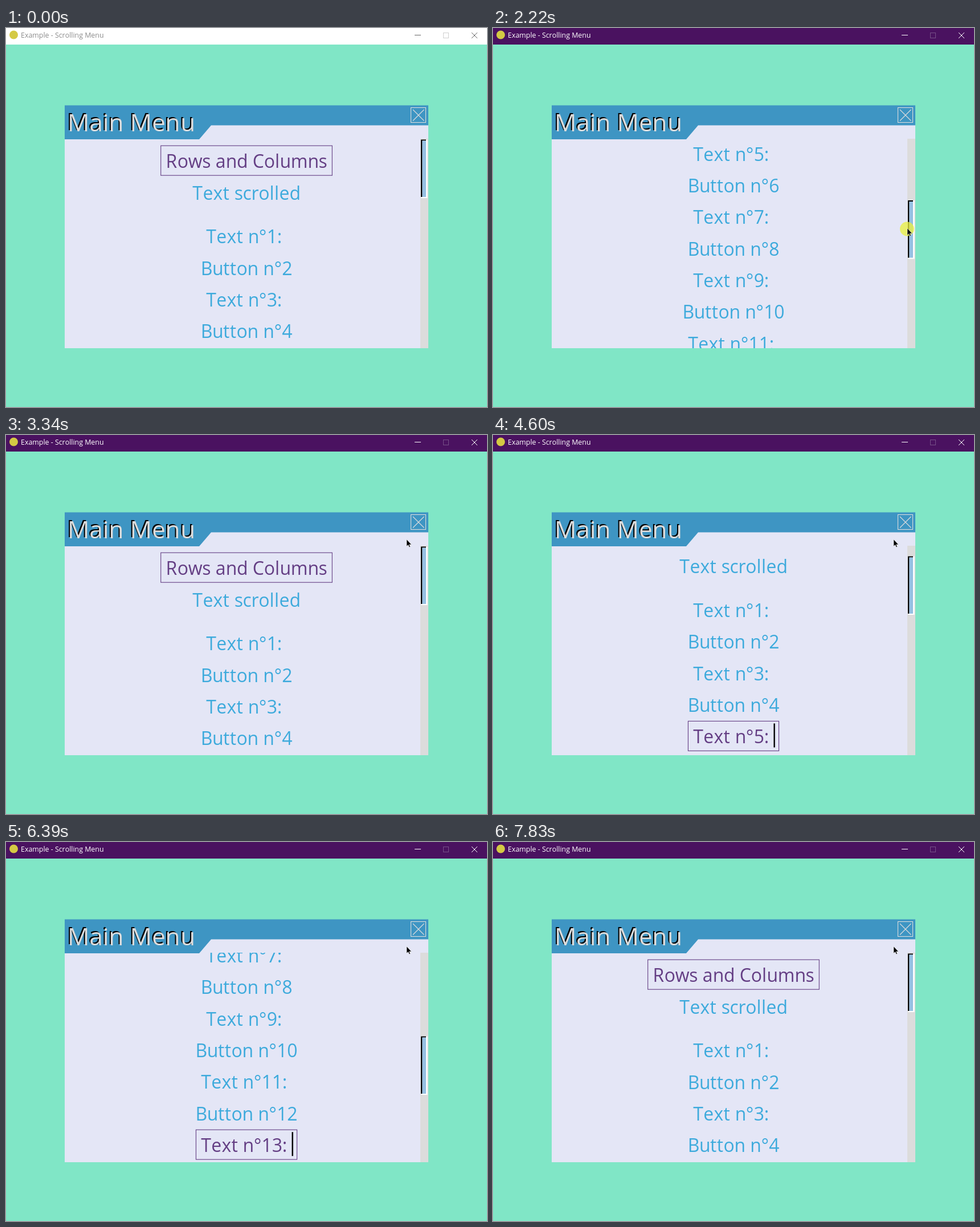
Recreate the animation shown at these times as an HTML page. Size 844 by 664 pixels, loop 8000 ms.

```html
<!DOCTYPE html>
<html lang="en">
<head>
<meta charset="utf-8">
<title>Scrolling Menu</title>
<style>
  html, body { margin: 0; width: 100%; height: 100%; overflow: hidden; background: #80e6c6; }
  svg { display: block; width: 844px; height: 664px; font-family: "Open Sans", sans-serif; }
  text { font-kerning: none; white-space: pre; }
  .item { fill: #3daadc; }
  .item.on { fill: #643e84; }
</style>
</head>
<body>
<svg viewBox="0 0 844 664" xmlns="http://www.w3.org/2000/svg">
  <defs>
    <clipPath id="view"><rect x="103" y="194" width="624" height="367"/></clipPath>
  </defs>
  <rect width="844" height="664" fill="#80e6c6"/>

  <rect id="bar" width="844" height="29"/>
  <circle cx="13.5" cy="12" r="7.5" fill="#d4c944"/>
  <text id="caption" x="26" y="17.3" font-size="12.4">Example - Scrolling Menu</text>
  <g fill="none" stroke-width="1">
    <path id="winMin" d="M717 12.5H728"/>
    <rect id="winMax" x="767.5" y="8.5" width="9" height="9"/>
    <path id="winClose" d="M817 8L827 18M827 8L817 18"/>
  </g>

  <rect x="103" y="136" width="638" height="425" fill="#e4e6f6"/>
  <g clip-path="url(#view)">
    <g id="list">
      <rect id="frame" height="52" fill="none" stroke="#643e84" stroke-width="1.1"/>
      <rect id="caret" width="2.4" height="42" fill="#000"/>
    </g>
  </g>

  <path d="M103 135.5H741V170.5H360L339 195H103Z" fill="#3e95c3"/>
  <text id="shade" y="179" fill="#000"></text>
  <text id="heading" y="181" fill="#dcdcdc"></text>
  <g fill="none" stroke="#dcdcdc" stroke-width="1.1">
    <rect x="710.5" y="139.5" width="26" height="26"/>
    <path d="M714 143L733.5 162.5M733.5 143L714 162.5"/>
  </g>

  <rect x="727" y="194" width="14" height="367" fill="#dcdcdc"/>
  <g id="thumb">
    <rect x="728" y="195.5" width="11.5" height="102.5" fill="#fff"/>
    <path d="M728 195.5H737V197.5H730.5V296H728Z" fill="#000"/>
    <rect x="730.5" y="197.5" width="6.5" height="98.5" fill="#96c0e2"/>
  </g>

  <g id="mouse">
    <circle id="press" cx="-0.5" cy="1" r="12.5" fill="#ebf03c" opacity="0.75"/>
    <path d="M0 0V12L2.7 9.5L4.6 13.6L6.4 12.8L4.6 8.9H8.4Z" fill="#000" stroke="#fff" stroke-width="0.5"/>
  </g>
</svg>
<script>
const LOOP = 8000, MID = 422, PITCH = 55.35, PAD = 8.8;
const ZOOM = 1.064;     // the menu is laid out in whole pixels, then enlarged
const RATIO = 3.4375;   // list pixels per thumb pixel
const GRAB = 244.5;     // pointer height that holds the thumb at the top
const PRESS = 1920, RELEASE = 3340;
const $ = id => document.getElementById(id);
const clamp = (v, lo, hi) => Math.max(lo, Math.min(hi, v));
const set = (el, attrs) => {
  for (const key in attrs) el.setAttribute(key, attrs[key]);
};

// Glyph starts with each advance rounded to a whole pixel; the last is the width
const pen = document.createElement("canvas").getContext("2d");
function advances(label, size) {
  pen.font = `${size}px "Open Sans", sans-serif`;
  const stops = [0];
  for (const ch of label) {
    stops.push(stops[stops.length - 1] + Math.round(pen.measureText(ch).width) * ZOOM);
  }
  return stops;
}

function typeset(el, label, size, left, stops = advances(label, size)) {
  el.textContent = label;
  set(el, { "font-size": size * ZOOM, x: stops.slice(0, -1).map(s => left + s).join(" ") });
}

typeset($("shade"), "Main Menu", 40, 106);
typeset($("heading"), "Main Menu", 40, 108);

// Rows: label and baseline
const items = [
  { label: "Rows and Columns", y: 245.2 },
  { label: "Text scrolled", y: 300.5 }
];
for (let n = 1; n <= 20; n++) {
  const input = n % 2 === 1;
  const label = n === 20 ? "Exit" : input ? `Text n°${n}: ` : `Button n°${n}`;
  items.push({ label, input, y: 377.4 + (n - 1) * PITCH });
}

for (const item of items) {
  const stops = advances(item.label, 30);
  item.half = stops[stops.length - 1] / 2;
  item.el = document.createElementNS("http://www.w3.org/2000/svg", "text");
  set(item.el, { class: "item", y: item.y });
  typeset(item.el, item.label, 30, MID - item.half, stops);
  $("list").insertBefore(item.el, $("frame"));
}

// Times of the key presses; the last one wraps to the top
const keys = [
  3910, 4030, 4220, 4320, 4420, 4600, 4720,
  4910, 5020, 5130, 5240, 5350, 5460, 6390,
  6570, 6700, 6830, 7020, 7140, 7330, 7450, 7830
];

// Pointer moves: start, end, number of steps, evenly spaced path points
const moves = [
  [180, 430, 5, [[822, 618], [700, 390], [647, 297]]],
  [740, 920, 4, [[610, 286], [515, 259], [488, 253]]],
  [1170, 1920, 13, [[479, 270], [505, 283], [600, 278], [690, 258], [736, 245]]],
  [1980, 2530, 10, [[737, 252], [728, 325], [725, 403], [726, 440]]],
  [2900, 3267, 6, [[725, 410], [723, 285], [703, 183]]]
];

function along(path, p) {
  const x = p * (path.length - 1);
  const i = Math.min(Math.floor(x), path.length - 2);
  return path[i].map((v, k) => v + (path[i + 1][k] - v) * (x - i));
}

function pointer(t) {
  const move = moves.filter(m => t >= m[0]).pop();
  if (!move) return null;
  const [start, end, count, path] = move;
  const step = Math.floor((t - start) / (end - start) * (count - 1) + 0.1);
  return along(path, clamp(step / (count - 1), 0, 1));
}

function thumbFor(selected) {
  const n = selected - 1;
  return n < 5 ? 0 : 17 + 16 * (n - 5) + (n > 16 ? 1 : 0);
}

function paintWindow(active) {
  const ink = active ? "#fff" : "#666";
  $("bar").setAttribute("fill", active ? "#4a1260" : "#fff");
  $("caption").setAttribute("fill", active ? "#fff" : "#8c8c8c");
  $("winMin").setAttribute("stroke", ink);
  $("winClose").setAttribute("stroke", ink);
  $("winMax").setAttribute("stroke", active ? "#765088" : "#d0d0d0");
}

function draw(t) {
  const pos = pointer(t);
  const held = t >= PRESS && t < RELEASE;
  const selected = keys.filter(k => t >= k).length % items.length;
  const offset = held ? clamp(pos[1] - GRAB, 0, 262) : thumbFor(selected);

  paintWindow(t >= PRESS);
  set($("mouse"), {
    visibility: pos ? "visible" : "hidden",
    transform: `translate(${pos || "0,0"})`
  });
  set($("press"), { display: held ? "inline" : "none" });
  set($("thumb"), { transform: `translate(0 ${offset})` });
  set($("list"), { transform: `translate(0 ${-offset * RATIO})` });

  items.forEach((item, i) => item.el.classList.toggle("on", i === selected));
  const { y, half, input } = items[selected];
  set($("frame"), { x: MID - half - PAD, y: y - 39, width: (half + PAD) * 2 });
  set($("caret"), {
    x: MID + half - 0.3,
    y: y - 35,
    visibility: input ? "visible" : "hidden"
  });
}

const begin = performance.now();
function tick() {
  draw((performance.now() - begin) % LOOP);
  requestAnimationFrame(tick);
}
tick();
</script>
</body>
</html>
```
